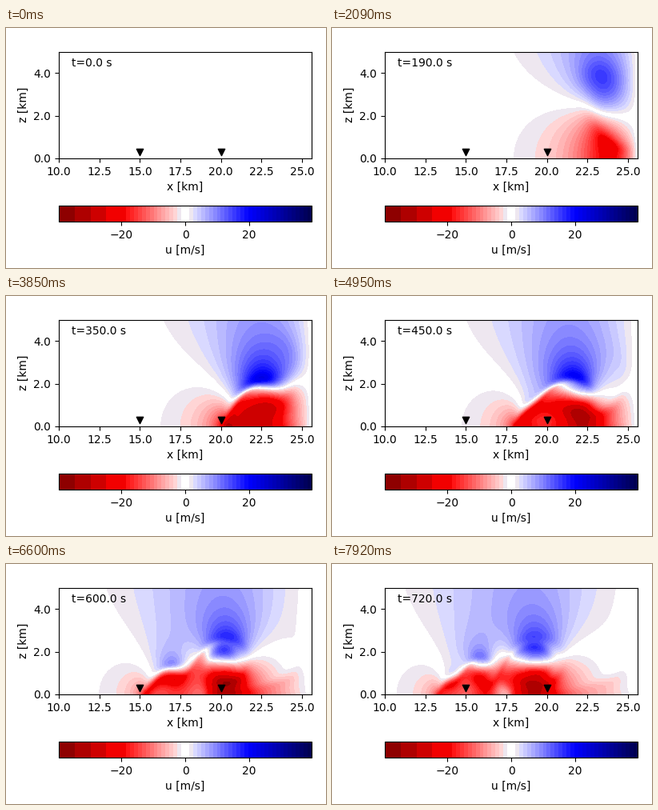
A matplotlib script that plays this animation: 400x300 px, repeating every 8000 ms.

```python
import matplotlib.pyplot as plt
import numpy as np
from matplotlib.animation import FuncAnimation
from matplotlib.cm import ScalarMappable
from matplotlib.colors import ListedColormap, Normalize

# Cold-air density current: anelastic vorticity / stream function model (SI units).
NX, NZ, D = 256, 64, 100.0
GRAVITY, CP, THETA0, VISCOSITY = 9.81, 1004.5, 300.0, 75.0
DT, STEPS_PER_FRAME, FRAMES = 2.0, 5, 73
LOOP_MS = 8000

x = D * np.arange(NX + 1)
z = D * np.arange(NZ + 1)
exner = 1 - GRAVITY * z / (CP * THETA0)
rho = exner ** 2.5

# Elliptic solver: sine transform in x, one inverse matrix per mode in z.
modes = np.arange(1, NX)
SINE = np.sin(np.pi * np.outer(modes, modes) / NX)
inv_rho = 2 / (rho[1:] + rho[:-1])
vertical = (np.diag(-(inv_rho[:-1] + inv_rho[1:]))
            + np.diag(inv_rho[1:-1], 1) + np.diag(inv_rho[1:-1], -1))
eigen = 2 * np.cos(np.pi * modes / NX) - 2
INVERSE = D ** 2 * np.linalg.inv(
    vertical + eigen[:, None, None] * np.diag(1 / rho[1:-1]))


def extend(f, width, parity):
    return np.pad(f, width, mode="reflect", reflect_type=parity)


def stream_function(eta):
    rhs = SINE @ -eta[1:-1, 1:-1] * (2 / NX)
    return np.pad(SINE @ (INVERSE @ rhs[:, :, None])[:, :, 0], 1)


def mass_fluxes(psi):
    p = extend(psi, 1, "odd")
    px = (p[1:] + p[:-1]) / 2
    pz = (p[:, 1:] + p[:, :-1]) / 2
    return (px[:, :-2] - px[:, 2:]) / (2 * D), (pz[2:] - pz[:-2]) / (2 * D)


def face_flux(speed, f):
    """Third-order upwind flux along the first axis."""
    a, b, c, d = f[:-3], f[1:-2], f[2:-1], f[3:]
    return (speed * (7 * (b + c) - a - d)
            + np.abs(speed) * (d - a - 3 * (c - b))) / 12


def divergence(mass_x, mass_z, g):
    fx = face_flux(mass_x, g[:, 2:-2])
    fz = face_flux(mass_z.T, g[2:-2].T).T
    return (np.diff(fx, axis=0) + np.diff(fz, axis=1)) / D


def laplacian(g):
    return (g[2:, 1:-1] + g[:-2, 1:-1] + g[1:-1, 2:] + g[1:-1, :-2]
            - 4 * g[1:-1, 1:-1]) / D ** 2


def tendency(theta, eta):
    mass_x, mass_z = mass_fluxes(stream_function(eta))
    t = extend(theta, 2, "even")
    e = extend(eta, 2, "odd")
    q = extend(eta / rho, 2, "odd")
    d_theta = (VISCOSITY * laplacian(t[1:-1, 1:-1])
               - divergence(mass_x, mass_z, t) / rho)
    theta_x = (t[3:-1, 2:-2] - t[1:-3, 2:-2]) / (2 * D)
    torque = -GRAVITY * theta_x / (THETA0 + theta)
    d_eta = (VISCOSITY * laplacian(e[1:-1, 1:-1])
             - divergence(mass_x, mass_z, q) + torque)
    d_eta[[0, -1]] = 0
    d_eta[:, [0, -1]] = 0
    return d_theta, d_eta


def advance(theta, eta):
    th, et = theta, eta
    for part in (3, 2, 1):
        d_theta, d_eta = tendency(th, et)
        th, et = theta + DT / part * d_theta, eta + DT / part * d_eta
    return th, et


def wind(eta):
    p = extend(stream_function(eta), 1, "odd")[1:-1]
    return (p[:, :-2] - p[:, 2:]) / (2 * D * rho)


def simulate():
    radius = np.hypot((x[:, None] - 25600) / 4000, (z - 3000) / 2000)
    cooling = -7.5 * (1 + np.cos(np.pi * np.minimum(radius, 1)))
    theta, eta = cooling / exner, np.zeros_like(cooling)
    winds = [wind(eta)]
    for _ in range(FRAMES - 1):
        for _ in range(STEPS_PER_FRAME):
            theta, eta = advance(theta, eta)
        winds.append(wind(eta))
    return winds


# Colour bands, counted outwards from zero wind; strong reds share wide bands.
U_MAX, HALF = 39.5, 32
LAVENDER = (0.935, 0.905, 0.94, 1)
RED_EDGES = [*range(2, 16), 20, 24, 28, 32]


def seismic(band):
    return plt.cm.seismic(0.5 + band / (2 * HALF))


center = [(1, 1, 1, 1), LAVENDER]
blues = center + [seismic(-(b + 0.5)) for b in range(2, HALF)]
reds = center + [seismic((lo + hi) / 2)
                 for lo, hi in zip(RED_EDGES, RED_EDGES[1:])
                 for _ in range(lo, hi)]
colors = reds[::-1] + blues
levels = np.linspace(-U_MAX, U_MAX, 2 * HALF + 1)

plt.rcParams.update({"font.family": "DejaVu Sans", "font.size": 10})
fig = plt.figure(figsize=(4, 3), dpi=100)


def pixel_axes(left, top, right, bottom):
    return fig.add_axes([left / 400, 1 - bottom / 300,
                         (right - left) / 400, (bottom - top) / 300])


ax = pixel_axes(66.05, 29.7, 382.05, 162.9)
ax.set(xlim=(10, 25.6), ylim=(0, 5), xlabel="x [km]", ylabel="z [km]",
       xticks=np.arange(10, 25.1, 2.5), yticks=[0, 2, 4])
ax.xaxis.set_major_formatter("{x:.1f}")
ax.yaxis.set_major_formatter("{x:.1f}")
ax.scatter([15, 20], [0.3, 0.3], marker="v", color="black", zorder=2)
clock = ax.text(0.05, 0.865, "", transform=ax.transAxes)

scale = ScalarMappable(Normalize(-U_MAX, U_MAX), ListedColormap(colors))
fig.colorbar(scale, cax=pixel_axes(66.05, 222, 382.05, 242),
             orientation="horizontal", ticks=[-20, 0, 20], label="u [m/s]")

winds = simulate()
view = np.s_[98:, :52]
contours = []


def update(n):
    while contours:
        contours.pop().remove()
    u = np.clip(winds[n][view], -U_MAX + 0.01, U_MAX - 0.01)
    contours.append(ax.contourf(x[98:] / 1000, z[:52] / 1000, u.T,
                                levels=levels, colors=colors))
    clock.set_text(f"t={n * DT * STEPS_PER_FRAME:.1f} s")
    return [clock]


anim = FuncAnimation(fig, update, frames=FRAMES, interval=LOOP_MS / FRAMES,
                     repeat=True, blit=False)
plt.show()
```
